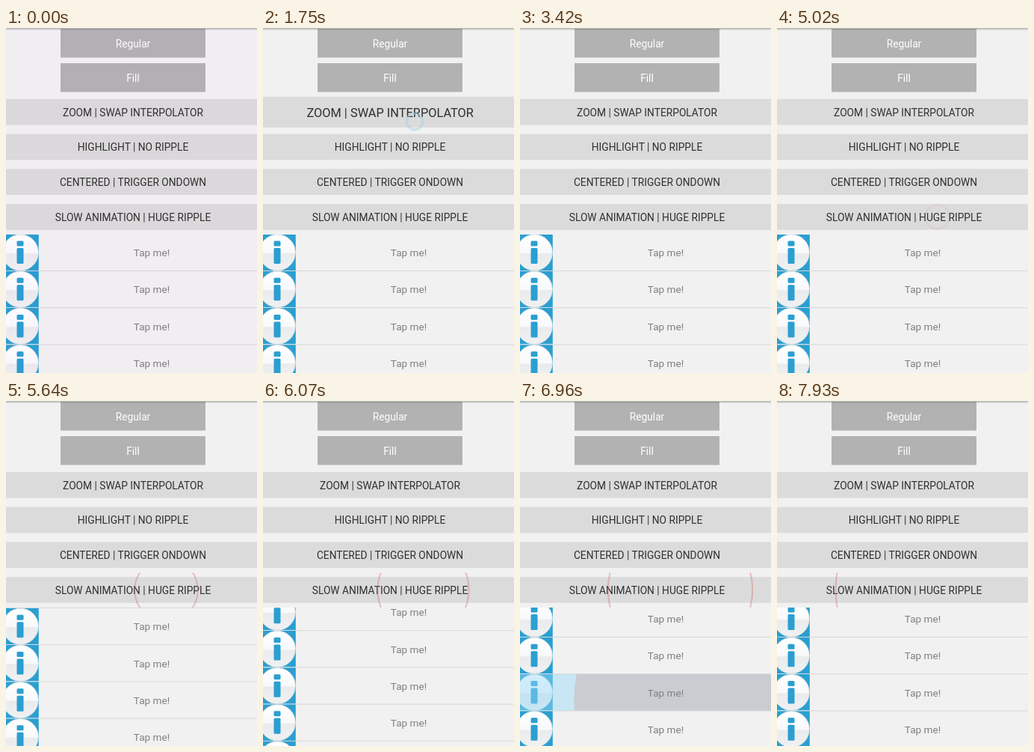
An HTML page for the animation above (8000 ms loop, 336 by 461 pixels).

```html
<!DOCTYPE html>
<html lang="en">
<head>
<meta charset="utf-8">
<title>Ripple demo</title>
<style>
  html, body { margin: 0; width: 100%; height: 100%; overflow: hidden; background: #f1f1f1; }
  svg { display: block; width: 336px; height: 461px; }
  text { font-family: Roboto, "Noto Sans", sans-serif; font-size: 13.75px; text-anchor: middle; }
  .caps { fill: #303030; }
  .label { fill: #fff; }
  .row { fill: #808080; font-size: 13.6px; }
  #tint { mix-blend-mode: multiply; }
</style>
</head>
<body>
<svg viewBox="0 0 336 461">
  <defs>
    <linearGradient id="gloss" x1="0" y1="0" x2="0" y2="1">
      <stop offset="0" stop-color="#fff"/>
      <stop offset=".5" stop-color="#f8f9fa"/>
      <stop offset=".54" stop-color="#eaebec"/>
      <stop offset="1" stop-color="#f0f1f2"/>
    </linearGradient>
    <linearGradient id="shade" x1="0" y1="0" x2="0" y2="1">
      <stop offset="0" stop-color="#000" stop-opacity=".28"/>
      <stop offset="1" stop-color="#000" stop-opacity="0"/>
    </linearGradient>
    <clipPath id="zoomClip"><rect y="66" width="336" height="75"/></clipPath>
    <clipPath id="centerClip"><rect y="188" width="336" height="34.6"/></clipPath>
    <clipPath id="slowClip"><rect y="229.5" width="336" height="46.5"/></clipPath>
    <clipPath id="listClip"><rect y="276" width="336" height="185"/></clipPath>
    <clipPath id="rowClip"><rect y="365" width="336" height="48.6"/></clipPath>
    <clipPath id="iconClip"><rect width="43.8" height="48.6"/></clipPath>
    <g id="icon" clip-path="url(#iconClip)">
      <rect width="44" height="48.6" fill="#2b9fd1"/>
      <circle cx="19.3" cy="24.4" r="24" fill="url(#gloss)" stroke="#dfe4e7"/>
      <rect x="14.5" y="9" width="9" height="7" rx="1.5" fill="#2b9fd1"/>
      <rect x="14.5" y="18.5" width="9" height="21" rx="1.5" fill="#2b9fd1"/>
    </g>
  </defs>
  <rect width="336" height="461" fill="#f1f1f1"/>
  <g id="buttons"></g>
  <g id="bars"></g>
  <g clip-path="url(#zoomClip)">
    <circle id="zoomRing" cx="203" cy="125" fill="none" stroke="#a9d2e2" stroke-width="3.5"/>
  </g>
  <rect id="flash" y="135" width="336" height="47.5" fill="#33b5e5"/>
  <g clip-path="url(#centerClip)">
    <circle id="centerDot" cx="170" cy="205.3"/>
  </g>
  <g clip-path="url(#slowClip)">
    <circle id="slowRing" cx="214.5" cy="252.5" fill="none" stroke="#cf6c6c" stroke-opacity=".38" stroke-width="2"/>
  </g>
  <g clip-path="url(#listClip)">
    <g id="rows"></g>
    <g id="tap" clip-path="url(#rowClip)">
      <rect y="365" width="336" height="49" fill="#96d7f5" fill-opacity=".45"/>
      <circle id="tapDot" cx="262" cy="400" fill="#cbccd1"/>
    </g>
    <g id="names"></g>
  </g>
  <rect width="336" height="3.5" fill="url(#shade)"/>
  <rect id="tint" width="336" height="461" fill="#fffcff"/>
</svg>
<script>
const LOOP = 8000, STEP = 88.3, FIRST = 1130, PITCH = 49.2;
const $ = id => document.getElementById(id);

function set(el, attrs) {
  for (const k in attrs) el.setAttribute(k, attrs[k]);
  return el;
}

function add(parent, tag, attrs, text = '') {
  const el = document.createElementNS('http://www.w3.org/2000/svg', tag);
  el.textContent = text;
  return parent.appendChild(set(el, attrs));
}

['Regular', 'Fill'].forEach((name, i) => {
  const y = 1 + i * 46;
  add($('buttons'), 'rect', { x: 73, y, width: 194, height: 38.5, fill: '#b2b2b2' });
  add($('buttons'), 'text', { x: 170, y: y + 25, class: 'label' }, name);
});

const bars = [
  'ZOOM | SWAP INTERPOLATOR',
  'HIGHLIGHT | NO RIPPLE',
  'CENTERED | TRIGGER ONDOWN',
  'SLOW ANIMATION | HUGE RIPPLE'
].map((name, i) => {
  const y = 95 + i * 46.7, g = add($('bars'), 'g', {});
  add(g, 'rect', { x: -4, y, width: 344, height: 34.6, fill: '#dbdbdb' });
  add(g, 'text', { x: 170, y: y + 22.6, class: 'caps' }, name);
  return g;
});

for (let i = 0; i < 5; i++) {
  const y = 275.6 + i * PITCH;
  add($('rows'), 'use', { href: '#icon', y });
  add($('rows'), 'rect', { x: 0, y: y + 48.5, width: 336, height: 1, fill: '#d8d8d8' });
  add($('names'), 'text', { x: 195, y: y + 29.6, class: 'row' }, 'Tap me!');
}

// Progress from 0 to 1 between two times; pulse rises, holds and falls.
const ramp = (t, from, to) => Math.min(1, Math.max(0, (t - from) / (to - from)));
const pulse = (t, a, b, c, d) => ramp(t, a, b) - ramp(t, c, d);
const smooth = p => p * p * (3 - 2 * p);

function draw(time) {
  const t = FIRST + STEP * Math.floor((time - FIRST + 8) / STEP);

  set($('tint'), { opacity: 1 - ramp(t, 1050, 1480) });

  const zoom = 1 + 1.4 * Math.sin(Math.PI * ramp(t, 1700, 2810));
  set(bars[0], { transform: `translate(169 112.3) scale(${zoom}) translate(-169 -112.3)` });
  set($('zoomRing'), { r: 187 * ramp(t, 1700, 2543), opacity: 0.5 * pulse(t, 1700, 1750, 2550, 2725) });

  set($('flash'), { opacity: 0.25 * pulse(t, 2940, 3000, 3080, 3410) });
  set($('centerDot'), { r: 180 * ramp(t, 3640, 3950), opacity: 0.1 * pulse(t, 3640, 3690, 3870, 4030) });

  const ring = 16 + 45 * ramp(t, 5015, 6074) + 75 * ramp(t, 6074, 7930);
  set($('slowRing'), { r: ring, opacity: 0.3 * ramp(t, 5000, 5015) + 0.7 * ramp(t, 5015, 5400) });

  const up = 110 * smooth(ramp(t, 5015, 5800));
  const back = 101 * (1 - (1 - ramp(t, 5800, 6690)) ** 1.5);
  const shift = { transform: `translate(0 ${-((up - back) % PITCH)})` };
  set($('rows'), shift);
  set($('names'), shift);

  set($('tap'), { opacity: pulse(t, 6740, 6800, 7050, 7390) });
  set($('tapDot'), { r: 340 * ramp(t, 6690, 7170) });
}

const start = performance.now();
function tick() {
  draw((performance.now() - start) % LOOP);
  requestAnimationFrame(tick);
}
tick();
</script>
</body>
</html>
```
